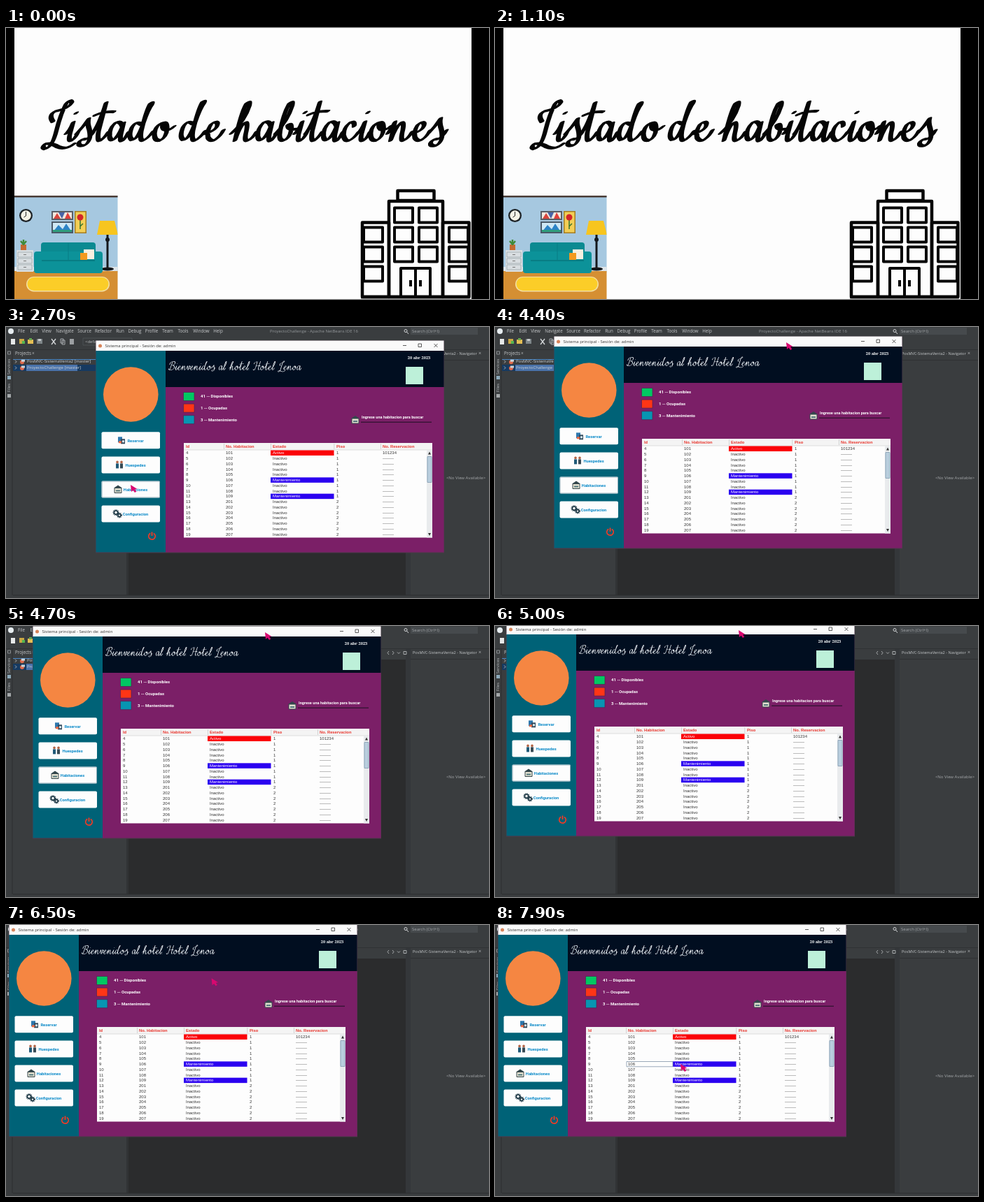
An HTML page with a canvas that plays this animation: 690 px wide and 388 px high, repeating every 8000 ms.

```html
<!DOCTYPE html>
<html lang="es">
<head>
<meta charset="utf-8">
<title>Listado de habitaciones</title>
<style>
html, body { margin: 0; width: 100%; height: 100%; overflow: hidden; background: #000; }
canvas { display: block; width: 690px; height: 388px; }
</style>
</head>
<body>
<canvas id="stage" width="690" height="388" aria-label="Listado de habitaciones"></canvas>
<script>
const c = document.getElementById('stage').getContext('2d');
const LOOP = 8000, CUT = 2500, SNAP = 6100, CLICK = 7200;
const UI = 'Roboto, sans-serif', SYS = '"Liberation Sans", Arial, sans-serif', IDE = '"Open Sans", sans-serif';

function box(x, y, w, h, fill) { c.fillStyle = fill; c.fillRect(x, y, w, h); }
function frame(x, y, w, h, color, width = 1) {
  c.strokeStyle = color; c.lineWidth = width; c.strokeRect(x, y, w, h);
}
function round(x, y, w, h, r, fill) {
  c.fillStyle = fill; c.beginPath(); c.roundRect(x, y, w, h, r); c.fill();
}
function disc(x, y, rx, fill, ry = rx) {
  c.fillStyle = fill; c.beginPath(); c.ellipse(x, y, rx, ry, 0, 0, 7); c.fill();
}
function path(d, color, width = 1) {
  c.strokeStyle = color; c.lineWidth = width; c.stroke(new Path2D(d));
}
function shape(d, fill) { c.fillStyle = fill; c.fill(new Path2D(d)); }
function text(s, x, y, color, font, align = 'left') {
  c.font = font; c.fillStyle = color; c.textAlign = align; c.textBaseline = 'middle';
  c.fillText(s, x, y);
}

// Handwriting: [advance, pen path] per letter, baseline at 0
const PEN = {
  L: [34, 'M15-27Q8-37 19-42Q38-46 42-54Q40-60 34-53Q26-38 20-14Q14 10 4 12Q-2 10 4 5Q12 3 22 9Q34 14 45 5'],
  B: [42, 'M26-50Q16-20 8 0M8-34Q12-54 36-54Q48-50 40-38Q34-30 24-30Q42-30 36-12Q28 2 8 0Q0-2 2-8'],
  H: [42, 'M4-38Q6-52 24-52Q18-20 6 0Q0 4-2-4M44-54Q32-20 30-6Q30 2 40-4M12-24Q26-30 42-26'],
  a: [28, 'M21-21Q18-29 11-25Q2-17 3-5Q5 3 12-4Q19-12 23-25L19-8Q17 3 22 0Q26-4 30-12'],
  b: [27, 'M0-10Q16-26 23-48Q25-57 19-52Q11-38 6-12Q4 1 11 0Q20-3 22-16Q22-25 17-22Q17-14 29-16'],
  c: [23, 'M18-20Q19-28 12-25Q3-18 3-7Q5 2 11 0Q18-3 24-12'],
  d: [36, 'M20-23Q13-29 7-19Q1-5 7-1Q15-1 23-24Q30-44 35-50Q38-56 33-53Q27-42 20-12Q18 1 23 0Q30-3 37-13'],
  e: [24, 'M0-9Q18-14 18-23Q16-28 9-22Q3-13 5-4Q9 3 16-2Q22-6 26-14'],
  h: [34, 'M0-10Q18-26 25-48Q27-57 21-52Q14-40 5 0Q13-23 20-25Q24-25 20-9Q18 2 23 0Q30-3 35-12'],
  i: [15, 'M0-10Q6-16 10-26L5-8Q3 2 8 0Q13-3 17-12M14-39l.5-.5'],
  l: [15, 'M0-10Q18-26 22-50Q23-58 18-52Q10-36 5-10Q3 2 8 0Q13-3 16-12'],
  n: [33, 'M0-10Q6-18 10-26L4 0Q11-19 19-25Q24-26 20-10Q18 1 22 0Q29-3 34-12'],
  o: [27, 'M15-25Q4-22 3-9Q3 1 11 0Q20-4 21-16Q21-27 15-25Q13-16 20-15Q26-15 31-20'],
  s: [22, 'M0-10Q10-20 17-31Q15-24 18-16Q22 1 11 7Q2 9 3 3Q6-2 13-2Q20-4 25-14'],
  t: [22, 'M0-10Q10-22 20-54L9-12Q7 2 12 0Q18-4 23-12M4-36Q16-42 31-41'],
  v: [22, 'M0-10Q4-24 8-26Q10-20 9-4Q9 2 14-4Q21-14 19-27Q20-22 26-22'],
  '.': [8, 'M2-1l.5-.5'],
  ' ': [24, '']
};
function script(s, x, y, size, width, color) {
  const nib = new DOMMatrix().rotate(-25).scale(1, .38), inv = nib.inverse(), p = new Path2D();
  for (const ch of s) {
    const [advance, d] = PEN[ch];
    p.addPath(new Path2D(d), inv.multiply(new DOMMatrix([size, 0, 0, size, x, y])));
    x += advance * size;
  }
  c.save();
  c.transform(nib.a, nib.b, nib.c, nib.d, 0, 0);
  c.lineCap = c.lineJoin = 'round';
  c.strokeStyle = color; c.lineWidth = width;
  c.stroke(p);
  c.restore();
}

function room() {
  c.save();
  c.beginPath(); c.rect(12, 240, 147.5, 148); c.clip();
  box(12, 240, 148, 110, '#a6c8e0');
  box(12, 240, 148, 2.5, '#4a3c36');
  box(12, 342, 148, 6, '#dfe6ea');
  box(12, 348, 148, 40, '#d58f33');
  disc(28.5, 268.5, 9.5, '#1d2226'); disc(28.5, 268.5, 7.2, '#f7f3e6');
  path('M28.5 263v6l-3 2', '#222');
  box(65, 262, 31, 13, '#5a5f66'); box(67, 264, 27, 9, '#f1e7dd');
  shape('M68 273l5-8 5 8z', '#d8453c'); shape('M75 264h9l-4 9z', '#4965a8'); shape('M84 273l4-9 5 9z', '#e0403c');
  box(65, 277, 31, 17, '#4b5968'); box(67, 279, 27, 13, '#cfe7f4');
  shape('M67 292l8-10 6 6 5-8 8 12z', '#2d83c6'); box(67, 289, 27, 3, '#2f9d7b');
  box(98, 262, 17, 32, '#a37c25'); box(99.5, 263.5, 14, 29, '#f3cf55');
  path('M106 273v15m0-4l4-4', '#39752f', 1.5); disc(106, 271, 4.5, '#d2262b');
  box(143.5, 294, 3, 50, '#15181b'); disc(145, 303, 3, '#15181b'); disc(145, 345, 9, '#15181b', 2.5);
  shape('M134 276h21l5 20h-30z', '#f7c51f');
  round(50, 307, 78, 28, 4, '#0b8a91');
  round(40, 320, 98, 31, 4, '#0c9299');
  box(51, 332, 76, 2, '#087d84'); path('M89 308v24', '#087d84');
  box(111, 317, 15, 14, '#f7efe0'); box(106, 322, 10, 10, '#f39a1e');
  box(15, 318, 24, 31, '#d9dee1');
  for (let y = 321; y < 345; y += 9) { frame(17, y, 20, 7, '#9ca7ad', .8); box(25, y + 3, 4, 1, '#777'); }
  box(21, 310, 8, 8, '#c46b32');
  path('M25 311v-8m0 7l-4-5m4 5l4-5', '#3f8a3a', 2.5);
  round(29, 356, 119, 21.5, 10.7, '#f3dfa0');
  round(30.5, 357, 116, 19, 9.5, '#fbcd28');
  c.restore();
}

function building() {
  const ink = '#050505', w = 4.5;
  c.lineJoin = 'round';
  frame(559.5, 233, 52, 14, ink, w);
  frame(547, 248, 77, 137, ink, w);
  frame(509, 278.5, 38, 106.5, ink, w);
  frame(624, 278.5, 37.5, 106.5, ink, w);
  for (let i = 0; i < 3; i++) {
    const y = 257.5 + i * 28;
    for (const x of [555, 590]) frame(x, y, 26, 21, ink, 4);
    for (const x of [511, 633]) frame(x, y + 28, 27, 21, ink, 4);
  }
  frame(564, 344, 42, 41, ink, 4);
  path('M585 344v41M578 361v9M592 361v9', ink, 4);
  path('M507 385h156', ink, w);
}

function slide() {
  box(0, 0, 690, 388, '#000');
  box(12, 0, 653, 388, '#fdfdfd');
  script('Listado', 52, 161, 1, 7.8, '#050505');
  script('de', 246, 161, 1.04, 7.8, '#050505');
  script('habitaciones', 322, 161, 1.02, 7.8, '#050505');
  room();
  building();
}

function ide() {
  const ink = '#b4b7b9';
  box(0, 0, 690, 388, '#3a3d3f');
  box(175, 48, 396, 336, '#2b2c2d');
  box(172, 32, 3, 352, '#313335'); box(571, 32, 7, 352, '#34373a');
  box(0, 32, 690, 1, '#303234'); box(8.5, 32, 1, 352, '#2c2e30');
  box(578, 47, 112, 1, '#2f3133'); box(10, 383.5, 680, 1, '#2d2f31');
  disc(7, 6, 4, '#e7edf0');
  const menu = { File: 22, Edit: 40, View: 58, Navigate: 84, Source: 112, Refactor: 139, Run: 163,
    Debug: 184, Profile: 208, Team: 231, Tools: 253, Window: 279, Help: 303 };
  for (const name in menu) text(name, menu[name], 6, '#c8cacc', '6.2px ' + IDE, 'center');
  text('ProyectoChallenge - Apache NetBeans IDE 16', 440, 6, '#94989b', '6px ' + IDE, 'center');
  box(578, 1, 96, 10, '#464a4d');
  c.strokeStyle = '#d4d6d8'; c.lineWidth = 1;
  c.beginPath(); c.arc(571, 5.5, 2, 0, 7); c.moveTo(572.5, 7); c.lineTo(575, 10); c.stroke();
  text('Search (Ctrl+I)', 580, 6.3, '#a1a4a7', '6px ' + IDE);

  box(7, 17, 6, 8, '#e6e8e8');
  box(19, 17, 7, 7, '#c9a743'); box(23, 20, 4, 4, '#55b64f');
  box(31, 18, 8, 6, '#e4bd54'); box(33, 16, 4, 3, '#66a84f');
  box(44, 17, 8, 7, '#7d8588'); box(46, 17, 4, 3, '#c6cacc');
  path('M65 17l6 8m0-8l-6 8', '#d5d8da', 1.3);
  frame(78, 17, 4, 6, '#a7abae'); frame(80, 19, 4, 6, '#a7abae');
  box(91, 17, 6, 8, '#9b9fa2');
  frame(110, 16, 70, 10, '#55595c', .7);
  text('<default config>', 113, 21, ink, '6px ' + IDE);

  text('Projects', 13, 38.5, '#c8cacc', '6.2px ' + IDE);
  text('×', 37, 38.5, ink, '6.5px ' + IDE);
  frame(2.5, 35, 4, 4, '#9b9fa1', .8);
  box(10, 46, 162, 1, '#4a88c7');
  box(10, 54, 162, 9, '#163a61'); box(29, 54, 73, 9, '#4972aa');
  ['PosMVC-SistemaVenta2 [master]', 'ProyectoChallenge [master]'].forEach((s, i) => {
    const y = 49.7 + i * 8.8;
    path(`M13 ${y - 2}l2 2l-2 2`, ink);
    disc(23, y + .5, 3, '#dd684b'); box(22, y - 3, 5, 3, '#c8d4da');
    text(s, 30, y, '#ced2d5', '6px ' + IDE);
  });
  for (const [s, y] of [['Services', 57], ['Files', 87]]) {
    c.save(); c.translate(4.5, y); c.rotate(-Math.PI / 2);
    text(s, 0, 0, ink, '6px ' + IDE, 'center');
    c.restore();
  }
  box(2, 70, 5, 5, '#8ca9ba'); box(2, 96, 5, 5, '#a4a8aa');

  path('M547 36l-2 2.5 2 2.5M552 36l2 2.5-2 2.5M559 37.5l2 2 2-2', ink, .9);
  frame(568, 36.5, 4, 4, ink, .9);
  text('PosMVC-SistemaVenta2 - Navigator', 581, 38.5, '#c5c8ca', '5.6px ' + IDE);
  text('×', 677, 38.5, ink, '7px ' + IDE, 'center');
  text('<No View Available>', 657, 216, '#a5a8aa', '6px ' + IDE, 'center');
}

function buttonIcon(i, x, y) {
  if (i === 0) {
    box(x - 5, y - 5, 6, 8, '#2e78ae'); box(x - 1, y - 2, 6, 7, '#32495c');
    box(x - 4, y + 1, 4, 3, '#ee6a42'); box(x + 1, y, 3, 3, '#d7edf5');
  } else if (i === 1) {
    for (const [dx, color] of [[-3, '#205a78'], [3, '#384b55']]) {
      disc(x + dx, y - 4, 1.8, '#b36445'); box(x + dx - 2, y - 2, 4, 7, color);
    }
  } else if (i === 2) {
    roomIcon(x, y);
  } else {
    for (const [dx, dy, r] of [[-2, -2, 3], [3, 2, 2.4]]) {
      c.save(); c.setLineDash([1.2, 1]);
      c.strokeStyle = '#1f3946'; c.lineWidth = 1.5;
      c.beginPath(); c.arc(x + dx, y + dy, r + .7, 0, 7); c.stroke();
      c.restore();
      c.strokeStyle = '#1f3946'; c.lineWidth = 1.6;
      c.beginPath(); c.arc(x + dx, y + dy, r - .4, 0, 7); c.stroke();
    }
  }
}
function roomIcon(x, y) {
  shape(`M${x - 6} ${y - 2}l6-4 6 4z`, '#33464c');
  box(x - 5, y - 2, 10, 7, '#e2dfcf');
  frame(x - 5, y - 2, 10, 7, '#34474c', 1);
  box(x - 3, y + 1, 6, 2, '#53787d');
}

function table(selected) {
  const cols = [257, 314, 381, 472, 538], edges = [311, 378, 468.5, 535];
  box(254, 166, 355, 135.5, '#fdfdfd');
  box(254, 166, 355, 10, '#f4f4f4');
  ['Id', 'No. Habitacion', 'Estado', 'Piso', 'No. Reservacion'].forEach((s, i) =>
    text(s, cols[i], 171.2, '#e8362e', 'bold 5.8px ' + SYS));
  edges.forEach(x => box(x, 167, .7, 8, '#c5c5c5'));
  box(254, 175.7, 355, .6, '#c9c9c9');
  for (let i = 0; i < 16; i++) {
    const y = 180.4 + i * 7.77, floor = i < 9 ? 1 : 2;
    const number = floor * 100 + (i < 9 ? i + 1 : i - 8);
    const state = i === 0 ? 'Activo' : i === 5 || i === 8 ? 'Mantenimiento' : 'Inactivo';
    const plain = state === 'Inactivo';
    if (!plain) box(378, y - 3.9, 90.5, 7.5, i ? '#2b00f0' : '#fb0007');
    const row = [i + 4, number, state, floor, i ? '--------' : '101234'];
    row.forEach((s, j) => text(s, cols[j], y + .2, j === 2 && !plain ? '#fff' : '#333', '6px ' + SYS));
  }
  if (selected) frame(312, 215.5, 66, 7.3, '#8295a8', .8);
  box(601, 176, 8, 125.5, '#e9ebed');
  round(601.5, 185, 7, 38, 2, '#b9cede');
  frame(602, 185.5, 6, 37, '#8199ad', .7);
  shape('M605 178.5l2 4h-4z', '#333'); shape('M605 299l2-4h-4z', '#333');
}

// Laid out where the window first stands; dx, dy is how far it was dragged
function hotel(dx, dy, selected, active) {
  c.save();
  c.translate(dx, dy);
  box(128, 19.5, 498, 304, '#50384d');
  box(128.5, 19.5, 497, 15, '#fafafa');
  disc(134.5, 27, 2.5, '#d78358');
  text('Sistema principal - Sesión de: admin', 141.5, 27, '#333', '6px ' + IDE);
  path('M567 26.5h5M611.5 24l5 5m0-5l-5 5', '#333', .8);
  frame(589, 24, 4.5, 4.5, '#333', .8);
  box(128.5, 34, 99.5, 288.5, '#006277');
  box(228, 34, 397.5, 52, '#010e20');
  box(228, 86, 397.5, 236.5, '#7b1f67');
  disc(178.3, 96.5, 39.3, '#f58642');

  ['Reservar', 'Huespedes', 'Habitaciones', 'Configuracion'].forEach((s, i) => {
    const y = 150.3 + i * 35.1, mid = y + 12;
    round(136.5, y, 83.5, 24, 2, '#fdfdfd');
    if (i === 2 && active) frame(137, y + .5, 82.5, 23, '#93aeba', 1);
    buttonIcon(i, [165, 162, 160, 159][i], mid);
    text(s, 185, mid + .5, '#0989c8', 'bold 5.8px ' + UI, 'center');
  });
  c.strokeStyle = '#f33a24'; c.lineWidth = 1.8;
  c.beginPath(); c.arc(208.5, 299.5, 4.7, -1.05, 4.2); c.moveTo(208.5, 293.5); c.lineTo(208.5, 299); c.stroke();

  script('Bienvenidos al hotel. Hotel Lenoa', 232, 61.5, .226, 1, '#f0f3f7');
  text('20 abr 2023', 590, 44, '#fff', 'bold 5.8px "Noto Serif", serif', 'center');
  box(571, 57, 25, 25, '#bdf0d9');
  [['#00c862', '41 -- Disponibles'], ['#ff3516', '1 -- Ocupadas'], ['#0795b2', '3 -- Mantenimiento']]
    .forEach(([color, s], i) => {
      const y = 93.5 + i * 16.6;
      box(253.5, y, 15.5, 12, color);
      frame(253.5, y, 15.5, 12, '#4e2550', .7);
      text(s, 278, y + 6.2, '#fff', 'bold 6px ' + UI);
    });
  roomIcon(499, 133);
  text('Ingrese una habitacion para buscar', 508, 129, '#fff', 'bold 5.6px ' + UI);
  box(507, 135.7, 101, 1, '#1c1022');
  table(selected);
  c.restore();
}

function pointer(x, y) {
  c.save();
  c.translate(x, y);
  shape('M-4-5L-3 5l2.5-2.3L2 6l2.3-1.4L2 1.5 5.5 1z', '#d90870');
  c.restore();
}

// Position on a walk through [time, x, y] stops
function follow(stops, t) {
  let i = 0;
  while (i < stops.length - 2 && t > stops[i + 1][0]) i++;
  const [t0, x0, y0] = stops[i], [t1, x1, y1] = stops[i + 1];
  const k = Math.min(1, Math.max(0, (t - t0) / (t1 - t0)));
  return [x0 + (x1 - x0) * k, y0 + (y1 - y0) * k];
}
const DRAG = [[3950, 0, 0], [4200, -18, -2], [4400, -44, -6], [4700, -90, -19], [5000, -112, -22],
  [5500, -124, -23.5]];
const MOUSE = [[2700, 182, 231], [3050, 190, 222], [3450, 350, 92], [3800, 464, 33], [3950, 464, 33]];
const AFTER = [[6000, 342, 10], [6300, 336, 22], [6800, 240, 170], [7100, 225, 203], [7400, 228, 204],
  [7800, 269, 204]];

function draw(t) {
  if (t < CUT) return slide();
  let [dx, dy] = follow(DRAG, t);
  let [x, y] = follow(MOUSE, t);
  if (t > 3950) { x = 464 + dx; y = 33 + dy; }
  if (t >= 6000) [x, y] = follow(AFTER, t);
  if (t >= SNAP) dy = -20;
  ide();
  hotel(dx, dy, t >= CLICK, t < SNAP);
  pointer(x, y);
}

function tick(now) {
  draw(Math.floor(now % LOOP / 100) * 100);
  requestAnimationFrame(tick);
}
draw(0);
requestAnimationFrame(tick);
</script>
</body>
</html>
```
